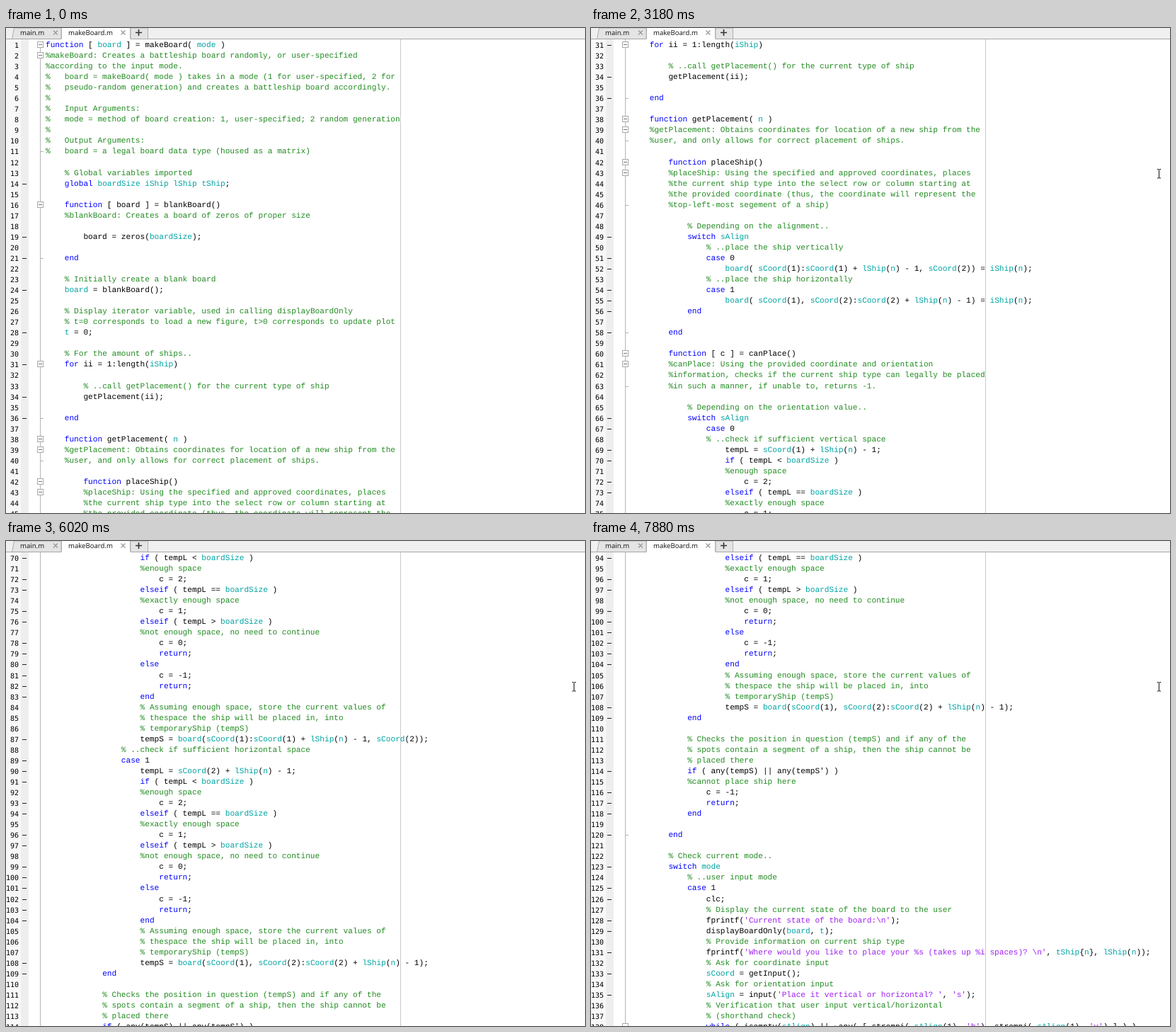
An HTML page for the animation above (8000 ms loop, 818x685 px).

```html
<!DOCTYPE html>
<html lang="en">
<head>
<meta charset="utf-8">
<title>Code editor</title>
<style>
html, body { margin: 0; width: 100%; height: 100%; overflow: hidden; background: #fff; }
#stage { position: relative; width: 818px; height: 685px; overflow: hidden; background: #fff; text-rendering: geometricPrecision; }
#stage div, #stage svg, #stage i { position: absolute; }
#numbers { left: 0; top: 16px; width: 21px; height: 669px; background: #f8f8f8; }
#alley { left: 21px; top: 16px; width: 11px; height: 669px; background: #eee; }
#limit { left: 557px; top: 16px; width: 1px; height: 669px; background: #cacaca; }
#foldline { left: 48px; top: 16px; bottom: 0; width: 1px; background: #b4b4b4; }
#caret { left: 56px; top: 16px; width: 1px; height: 15px; background: #000; }
.row { left: 0; width: 818px; height: 15px; line-height: 15px; white-space: pre; color: #000; }
.num { left: 0; top: 2px; width: 18px; text-align: right; font: 10px/15px "DejaVu Sans Mono", monospace; }
.code { left: 56px; top: 2px; font: 11.14px/15px "Liberation Mono", monospace; }
#stage .dash { left: 23px; top: 8px; width: 6px; height: 1px; background: #222; }
#stage .tick { left: 49px; top: 8px; width: 4px; height: 1px; background: #b4b4b4; }
#stage .fold { left: 44px; top: 3px; width: 7px; height: 7px; border: 1px solid #a8a8a8; background: #fff; }
#stage .fold::after { content: ""; position: absolute; left: 1px; top: 3px; width: 5px; height: 1px; background: #777; }
.c { color: #228b22; }
.k { color: #00f; }
.v { color: #00a3a3; }
.s { color: #a020f0; }
#tabs text { font: 9.6px "Open Sans", sans-serif; fill: #111; }
</style>
</head>
<body>
<div id="stage">
  <div id="numbers"></div>
  <div id="alley"></div>
  <div id="limit"></div>
  <div id="foldline"></div>
  <div id="rows"></div>
  <div id="caret"></div>
  <svg id="tabs" width="818" height="16" style="left:0;top:0">
    <rect width="818" height="16" fill="#f0f0f0"/>
    <path d="M8.5 15.5L11.5 0H78V15.5Z" fill="#e4e4e4" stroke="#b0b0b0"/>
    <path d="M176 15.5V0H200.5V15.5Z" fill="#e4e4e4" stroke="#b0b0b0"/>
    <path d="M0 15.5H818" stroke="#a6a6a6"/>
    <path d="M78.5 16V0H175.5V16Z" fill="#fff"/>
    <path d="M78.5 15V0M175.5 15V0" stroke="#b0b0b0"/>
    <text x="20" y="10">main.m</text>
    <text x="88" y="10">makeBoard.m</text>
    <path d="M67 3.5l6 6m0-6l-6 6M162.5 3.5l6 6m0-6l-6 6" stroke="#999" stroke-width="1.3"/>
    <path d="M183 6.5h9M187.5 2v9" stroke="#333" stroke-width="1.6"/>
  </svg>
  <svg id="cursor" width="7" height="14" style="left:0;top:0">
    <path d="M1 .5h2m1 0h2M1 13h2m1 0h2M3.5 1v12" fill="none" stroke="#111"/>
  </svg>
</div>
<script>
const spaceCheck = (axis, range) => `                    tempL = sCoord(${axis}) + lShip(n) - 1;
                    if ( tempL < boardSize )
                    %enough space
                        c = 2;
                    elseif ( tempL == boardSize )
                    %exactly enough space
                        c = 1;
                    elseif ( tempL > boardSize )
                    %not enough space, no need to continue
                        c = 0;
                        return;
                    else
                        c = -1;
                        return;
                    end
                    % Assuming enough space, store the current values of
                    % thespace the ship will be placed in, into
                    % temporaryShip (tempS)
                    tempS = board(${range});`;

const lines = String.raw`function [ board ] = makeBoard( mode )
%makeBoard: Creates a battleship board randomly, or user-specified
%according to the input mode.
%   board = makeBoard( mode ) takes in a mode (1 for user-specified, 2 for
%   pseudo-random generation) and creates a battleship board accordingly.
%
%   Input Arguments:
%   mode = method of board creation: 1, user-specified; 2 random generation
%
%   Output Arguments:
%   board = a legal board data type (housed as a matrix)

    % Global variables imported
    global boardSize iShip lShip tShip;

    function [ board ] = blankBoard()
    %blankBoard: Creates a board of zeros of proper size

        board = zeros(boardSize);

    end

    % Initially create a blank board
    board = blankBoard();

    % Display iterator variable, used in calling displayBoardOnly
    % t=0 corresponds to load a new figure, t>0 corresponds to update plot
    t = 0;

    % For the amount of ships..
    for ii = 1:length(iShip)

        % ..call getPlacement() for the current type of ship
        getPlacement(ii);

    end

    function getPlacement( n )
    %getPlacement: Obtains coordinates for location of a new ship from the
    %user, and only allows for correct placement of ships.

        function placeShip()
        %placeShip: Using the specified and approved coordinates, places
        %the current ship type into the select row or column starting at
        %the provided coordinate (thus, the coordinate will represent the
        %top-left-most segement of a ship)

            % Depending on the alignment..
            switch sAlign
                % ..place the ship vertically
                case 0
                    board( sCoord(1):sCoord(1) + lShip(n) - 1, sCoord(2)) = iShip(n);
                % ..place the ship horizontally
                case 1
                    board( sCoord(1), sCoord(2):sCoord(2) + lShip(n) - 1) = iShip(n);
            end

        end

        function [ c ] = canPlace()
        %canPlace: Using the provided coordinate and orientation
        %information, checks if the current ship type can legally be placed
        %in such a manner, if unable to, returns -1.

            % Depending on the orientation value..
            switch sAlign
                case 0
                % ..check if sufficient vertical space
${spaceCheck(1, "sCoord(1):sCoord(1) + lShip(n) - 1, sCoord(2)")}
                % ..check if sufficient horizontal space
                case 1
${spaceCheck(2, "sCoord(1), sCoord(2):sCoord(2) + lShip(n) - 1")}
            end

            % Checks the position in question (tempS) and if any of the
            % spots contain a segment of a ship, then the ship cannot be
            % placed there
            if ( any(tempS) || any(tempS') )
            %cannot place ship here
                c = -1;
                return;
            end

        end

        % Check current mode..
        switch mode
            % ..user input mode
            case 1
                clc;
                % Display the current state of the board to the user
                fprintf('Current state of the board:\n');
                displayBoardOnly(board, t);
                % Provide information on current ship type
                fprintf('Where would you like to place your %s (takes up %i spaces)? \n', tShip{n}, lShip(n));
                % Ask for coordinate input
                sCoord = getInput();
                % Ask for orientation input
                sAlign = input('Place it vertical or horizontal? ', 's');
                % Verification that user input vertical/horizontal
                % (shorthand check)
                while ( isempty(sAlign) || ~any( [ strcmpi( sAlign(1), 'h'), strcmpi( sAlign(1), 'v') ] ) )`.split("\n");

const keywords = new Set("function global end for switch case if elseif else return while".split(" "));
const shared = new Set("board mode boardSize iShip lShip tShip t n sAlign sCoord".split(" "));
const folds = new Set([1, 2, 16, 31, 38, 39, 42, 43, 60, 61, 138]);
const ticks = new Set([11, 21, 36, 40, 46, 58, 63, 120]);

function paint(line, num) {
  const localBoard = num >= 16 && num <= 21;
  return line.replace(/</g, "&lt;").replace(/(%.*)|((?<![\w)])'[^']*')|\w+/g, (word, comment, string) => {
    const kind = comment ? "c" : string ? "s" : keywords.has(word) ? "k"
      : shared.has(word) && !(localBoard && word === "board") ? "v" : "";
    return kind ? `<span class="${kind}">${word}</span>` : word;
  });
}

function rowHtml(num) {
  const line = lines[num - 1];
  const runs = /^\s*(?!function\b)[^%\s]/.test(line);
  return `<div class="num">${num}</div>` +
    (runs ? '<i class="dash"></i>' : "") +
    (folds.has(num) ? '<i class="fold"></i>' : "") +
    (ticks.has(num) ? '<i class="tick"></i>' : "") +
    `<div class="code">${paint(line, num)}</div>`;
}

const el = id => document.getElementById(id);
const htmlRows = lines.map((_, i) => rowHtml(i + 1));
const rows = Array.from({ length: 45 }, (_, i) => {
  const row = document.createElement("div");
  row.className = "row";
  row.style.top = Math.round(16 + i * 15.047) + "px";
  el("rows").append(row);
  return row;
});

// Each wheel notch moves three lines; a repeated time is a double notch.
const notches = [1620, 1840, 2070, 2150, 2230, 2670, 2750, 2830, 2990, 3180, 3230, 3380, 3380,
  4230, 4470, 4640, 4720, 4870, 5480, 5560, 5780, 5870, 6020, 6480, 6650, 6800, 6950,
  7220, 7270, 7810, 7880];
// time, x, y of the pointer's centre
const pointer = [[680, 816, 195], [750, 812, 197], [820, 807, 201], [890, 804, 204], [970, 802, 206]];
const loop = 8000;
let shownTop = 0;

function showFrom(top) {
  if (top === shownTop) return;
  shownTop = top;
  rows.forEach((row, i) => { row.innerHTML = htmlRows[top - 1 + i] || ""; });
  el("foldline").style.top = (top === 1 ? 28 : 16) + "px";
}

function draw(t) {
  showFrom(1 + 3 * notches.filter(at => at <= t).length);
  el("caret").style.visibility = t >= 1290 && t < 1620 ? "visible" : "hidden";
  const spot = pointer.filter(p => p[0] <= t).pop();
  el("cursor").style.visibility = spot ? "visible" : "hidden";
  if (spot) el("cursor").style.transform = `translate(${spot[1] - 3}px, ${spot[2] - 7}px)`;
}

const start = performance.now();
function tick(now) {
  draw(Math.max(0, now - start) % loop);
  requestAnimationFrame(tick);
}
draw(0);
requestAnimationFrame(tick);
</script>
</body>
</html>
```
